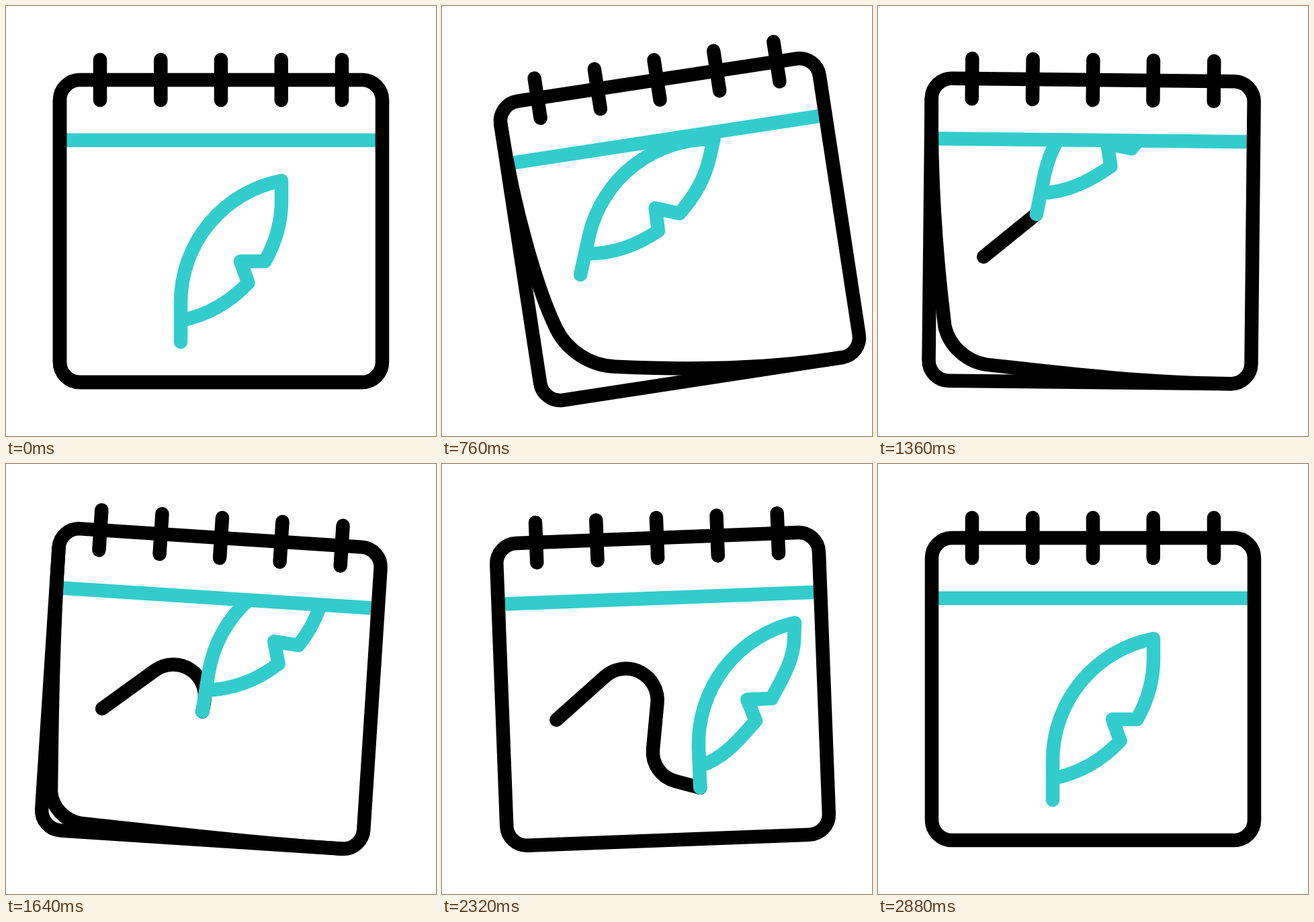
Write an HTML page with a canvas that moves like this. It is 640 px wide and 640 px high and loops after 3 s.

```html
<!DOCTYPE html>
<html lang="en">
<head>
<meta charset="utf-8">
<title>Calendar and quill</title>
<style>
  html, body { margin: 0; width: 100%; height: 100%; overflow: hidden; background: #fff; }
  canvas { display: block; }
  svg { position: absolute; }
</style>
</head>
<body>
<canvas id="stage" width="640" height="640"></canvas>
<svg width="0" height="0"><path id="ink" fill="none" d="M160 375L235 313A47 47 0 0 1 311 356L302 424A45 45 0 0 0 334 473L370 484"/></svg>
<script>
const LOOP = 3000, STEP = 40;
const BLACK = '#000', TEAL = '#33cccc';
const ctx = document.getElementById('stage').getContext('2d');
const ink = document.getElementById('ink');
const inkPath = new Path2D(ink.getAttribute('d'));
const inkLength = ink.getTotalLength();
const home = { x: 260, y: 500 };

const clamp = v => Math.min(1, Math.max(0, v));
const mix = (a, b, p) => a + (b - a) * p;
const smooth = u => u * u * (3 - 2 * u);

// Bezier ease with handles at (1/6, 0) and (5/6, 1).
function softEase(x) {
  let low = 0, high = 1;
  for (let i = 0; i < 24; i++) {
    const t = (low + high) / 2;
    if (t * (0.5 + t * (1.5 - t)) < x) low = t; else high = t;
  }
  return smooth((low + high) / 2);
}

const progress = (time, from, to, ease = softEase) => ease(clamp((time - from) / (to - from)));

function track(time, keys) {
  let value = keys[0][1];
  for (let i = 1; i < keys.length; i++) {
    const [start] = keys[i - 1], [end, target] = keys[i];
    if (time <= start) break;
    value = mix(value, target, progress(time, start, end));
  }
  return value;
}

const tiltKeys = [[200, 0], [805, -9], [1595, 4], [2157, -3], [2690, 0]];
const quillKeys = [[200, 0], [805, 22], [940, 22], [1600, 5.2], [2050, 9.6], [2320, 0]];
const bendKeys = [[700, 0], [1080, 1], [1600, 0], [2000, 0], [2320, 1], [2880, 0]];

function rotateAbout(x, y, degrees) {
  ctx.translate(x, y);
  ctx.rotate(degrees * Math.PI / 180);
  ctx.translate(-x, -y);
}

function line(x1, y1, x2, y2) {
  ctx.beginPath();
  ctx.moveTo(x1, y1);
  ctx.lineTo(x2, y2);
  ctx.stroke();
}

function drawBand() {
  ctx.strokeStyle = TEAL;
  ctx.lineCap = 'butt';
  line(80, 199.7, 560, 199.7);
  ctx.lineCap = 'round';
}

function drawFrame(curl) {
  ctx.strokeStyle = BLACK;
  ctx.beginPath();
  ctx.roundRect(80, 110, 480, 450, 30);
  ctx.stroke();

  if (curl > 0) {
    const at = (x, y, dx, dy) => [x + dx * curl, y + dy * curl];
    ctx.beginPath();
    ctx.moveTo(80, 140);
    ctx.bezierCurveTo(80, 280, ...at(80, 400, 20, 0), ...at(80, 530, 37, -80));
    ctx.bezierCurveTo(...at(80, 546.5, 48, -61), ...at(93.5, 560, 66.5, -46), ...at(110, 560, 87, -39));
    ctx.bezierCurveTo(...at(250, 560, 17, -24), 390, 560, 530, 560);
    ctx.stroke();
  }
  for (const x of [140, 230.3, 320, 409.7, 500]) line(x, 80, x, 140);
}

function drawInk(from, to) {
  const length = (to - from) * inkLength;
  if (length <= 0.1) return;
  ctx.strokeStyle = BLACK;
  ctx.setLineDash([length, inkLength * 2]);
  ctx.lineDashOffset = -from * inkLength;
  ctx.stroke(inkPath);
  ctx.setLineDash([]);
}

function drawQuill(tip, angle, bend) {
  const dx = -14 * bend, dy = -8.6 * bend;
  const notch = (x, y, share = 1) => `${x + dx * share} ${y + dy * share}`;
  const shape = new Path2D(
    `M260 500V440A185 185 0 0 1 410 260` +
    `L${notch(410, 290, 0.15)}C${notch(410, 323, 0.4)} ${notch(400, 354)} ${notch(385.5, 380)}` +
    `L${notch(349, 380)}L${notch(360.5, 412)}` +
    `C${notch(336, 438)} ${notch(302, 460, 0.3)} 260 468`);
  ctx.save();
  ctx.beginPath();
  ctx.rect(70, 200, 500, 500);
  ctx.clip();
  rotateAbout(tip.x, tip.y, angle);
  ctx.translate(tip.x - home.x, tip.y - home.y);
  ctx.strokeStyle = TEAL;
  ctx.stroke(shape);
  ctx.restore();
}

function quillTip(time, written) {
  const pen = ink.getPointAtLength(written * inkLength);
  const away = progress(time, 200, 805) - progress(time, 2320, 2880);
  return { x: mix(home.x, pen.x, away), y: mix(home.y, pen.y, away) };
}

function draw(time) {
  const written = progress(time, 930, 2200, smooth);
  const erased = progress(time, 2400, 2800);
  const curl = progress(time, 200, 805) - progress(time, 805, 2155, smooth);

  ctx.fillStyle = '#fff';
  ctx.fillRect(0, 0, 640, 640);
  ctx.save();
  ctx.lineWidth = 20.5;
  ctx.lineCap = ctx.lineJoin = 'round';
  rotateAbout(320, 110, track(time, tiltKeys));
  drawInk(erased, written);
  drawQuill(quillTip(time, written), track(time, quillKeys), track(time, bendKeys));
  drawBand();
  drawFrame(curl);
  ctx.restore();
}

function tick() {
  const time = performance.now() % LOOP;
  draw(Math.floor(time / STEP) * STEP);
  requestAnimationFrame(tick);
}
tick();
</script>
</body>
</html>
```
